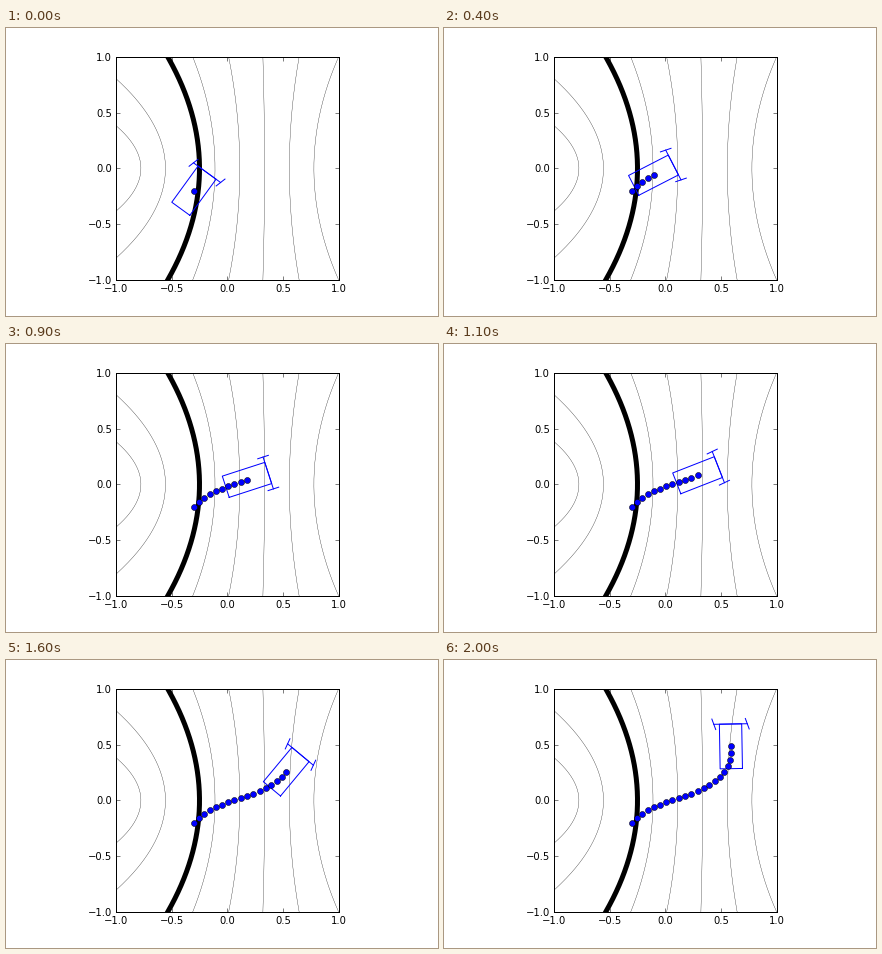
A matplotlib script for the animation above (2100 ms loop, 432 by 288 pixels).

```python
import numpy as np
import matplotlib.pyplot as plt
from matplotlib.animation import FuncAnimation

plt.rcParams.update({
    "font.family": "DejaVu Sans", "font.size": 10,
    "axes.linewidth": 1.0, "lines.linewidth": 1.0,
    "xtick.direction": "in", "ytick.direction": "in",
    "xtick.top": True, "ytick.right": True,
    "xtick.major.size": 4, "ytick.major.size": 4,
    "xtick.major.width": 0.5, "ytick.major.width": 0.5,
    "xtick.major.pad": 4, "ytick.major.pad": 4,
    "xtick.labelsize": 10, "ytick.labelsize": 10,
})

STEPS = 21
SPEED = 0.06       # distance per step
TURN = 0.55        # heading change per degree of steering
LENGTH, WIDTH, AXLE, WHEEL = 0.4, 0.2, 0.3, 0.1


def drive():
    """Steering, heading (radians) and position at every step."""
    steer = np.interp(np.arange(STEPS), [0, 2, 4, 6, 9, 13, 16, 18, 20],
                      [-16, -14, -8.5, -5, 0, 8.2, 15, 18.8, 19.3])
    turn = TURN * steer
    turn[0] = 54
    heading = np.radians(np.cumsum(turn))
    move = SPEED * np.column_stack([np.cos(heading), np.sin(heading)])
    move[0] = -0.3, -0.2
    return np.radians(steer), heading, np.cumsum(move, axis=0)


def rotate(points, angle):
    c, s = np.cos(angle), np.sin(angle)
    return np.asarray(points) @ np.array([[c, s], [-s, c]])


def car_parts(pos, heading, steer):
    """Body outline, front axle and the two steered wheels."""
    l, w, a = LENGTH / 2, WIDTH / 2, AXLE / 2
    body = [(-l, -w), (l, -w), (l, w), (-l, w), (-l, -w)]
    axle = [(l, -a), (l, a)]
    wheel = rotate([(-WHEEL / 2, 0), (WHEEL / 2, 0)], steer)
    shapes = [body, axle, wheel + (l, a), wheel + (l, -a)]
    return [rotate(s, heading) + pos for s in shapes]


fig = plt.figure(figsize=(6, 4), dpi=72, facecolor="white")
ax = fig.add_axes([0.125, 0.125, 0.775, 0.775])
ax.set_aspect("equal")
ax.set(xlim=(-1, 1), ylim=(-1, 1))
ticks = np.linspace(-1, 1, 5)
ax.set_xticks(ticks)
ax.set_yticks(ticks)

# level curves: x on the axis and bend with y squared
y = np.linspace(-1, 1, 201)
for x0, bend in [(-0.775, -1.52), (-0.555, -0.685), (-0.111, -0.2),
                 (0.111, -0.1), (0.333, -0.015), (0.555, 0.088),
                 (0.775, 0.222)]:
    ax.plot(x0 + bend * y**2, y, color="black", lw=0.3)
ax.plot(-0.25 - 0.285 * y**2, y, color="black", lw=5)

steering, headings, path = drive()
car = [ax.plot([], [], color="blue")[0] for _ in range(4)]
trail, = ax.plot([], [], "o", color="blue", ms=6, mec="black", mew=0.5)


def update(i):
    for line, pts in zip(car, car_parts(path[i], headings[i], steering[i])):
        line.set_data(pts[:, 0], pts[:, 1])
    trail.set_data(path[:i + 1, 0], path[:i + 1, 1])
    return [*car, trail]


anim = FuncAnimation(fig, update, frames=STEPS, interval=100,
                     repeat=True, repeat_delay=0, blit=False)
plt.show()
```
